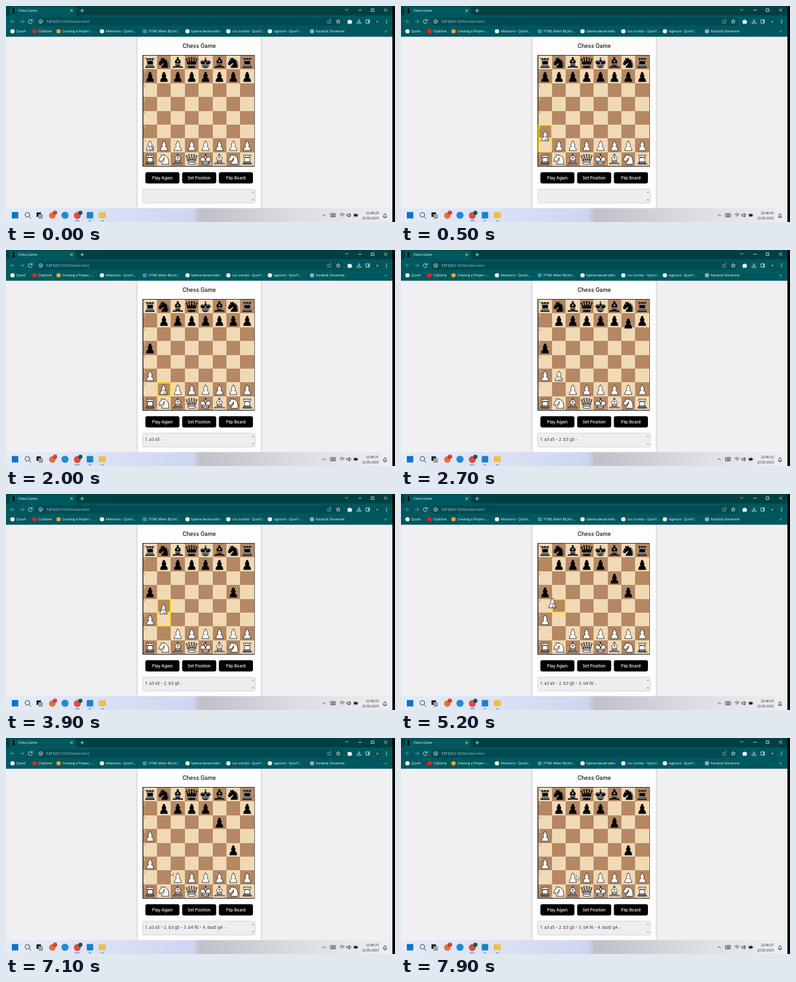
Animation, 600 px wide and 335 px high, one loop 8000 ms. Source, as an HTML page:

```html
<!DOCTYPE html>
<html lang="en">
<head>
<meta charset="utf-8">
<title>Chess Game</title>
<style>
  html, body { margin: 0; width: 100%; height: 100%; overflow: hidden; background: #f0eff2; }
  svg { display: block; width: 100%; height: 100%; }
  .ui { font: 5px "Open Sans", "Noto Sans", sans-serif; fill: #fff; }
  .page { font-family: Inter, "Open Sans", sans-serif; font-weight: 500; fill: #111; }
  .line { fill: none; stroke: #e4f0f0; stroke-width: .8; stroke-linecap: round; stroke-linejoin: round; }
  .dim { stroke: #7fa9ac; }
  .dark { stroke: #222; }
  .piece { stroke: #000; stroke-width: 1.5; stroke-linecap: round; stroke-linejoin: round; }
  .white { fill: #fff; }
  .black { fill: #000; }
  .detail, .inlay { fill: none; }
  .black .detail, .inlay { stroke: #fff; }
  .white .inlay { display: none; }
  .mark { fill: none; stroke: #ffe500; stroke-width: 1.5; }
  .note { font: 5.3px Inter, Arial, sans-serif; }
</style>
</head>
<body>
<svg id="stage" viewBox="0 0 600 335" xmlns="http://www.w3.org/2000/svg">
  <defs>
    <filter id="shadow" x="-10%" y="-10%" width="120%" height="120%">
      <feDropShadow dx="0" dy="0" stdDeviation="2.2" flood-opacity=".2"/>
    </filter>
    <linearGradient id="bar">
      <stop offset="0" stop-color="#e4ecf7"/>
      <stop offset=".17" stop-color="#dfe5f6"/>
      <stop offset=".48" stop-color="#ced5f1"/>
      <stop offset=".5" stop-color="#bfc0c8"/>
      <stop offset=".75" stop-color="#dcdde2"/>
      <stop offset="1" stop-color="#eeeff3"/>
    </linearGradient>
  </defs>

  <rect width="600" height="335" fill="#f0eff2"/>
  <rect x="203" y="46" width="190" height="268" rx="4" fill="#fdfdfe" filter="url(#shadow)"/>

  <g id="browser" class="ui">
    <rect width="600" height="47.5" fill="#004043"/>
    <path d="M3 14.5Q6 14.5 6 11V4Q6 1 9 1H105Q108 1 108 4V11Q108 14.5 111 14.5H600V47.3H0V14.5Z" fill="#00585f"/>
    <path d="M9.4 11h4.4l-1-2-.3-2.5.7-3h-3.2l.7 3-.3 2.5z" fill="#000"/>
    <text x="19" y="8.8">Chess Game</text>
    <path class="line" d="M99.5 5.5l3.5 3.5m0-3.5l-3.5 3.5M115 7.2h5m-2.5-2.5v5M523.5 5l2 2 2-2M544 6.5h4M563.5 4.5h4v4h-4zM583.5 4.5l4 4m0-4l-4 4"/>
    <rect x="46" y="17.5" width="474" height="13" rx="6.5" fill="#004b52"/>
    <path class="line dim" d="M13 24H7.5l2.5-2.5M7.5 24l2.5 2.5M22 24h5.5L25 21.5m2.5 2.5L25 26.5M498 22.5h-2v4h5v-2M498.5 24.5q0-3 3-3m-1.3-1.3l1.3 1.3-1.3 1.3"/>
    <path class="line" d="M40 22.5a3 3 0 1 0 .4 2.4M40.3 20.8v2h-2M53.3 23.8v2m0-3.7v.1"/>
    <circle class="line" cx="53.3" cy="24" r="2.8"/>
    <text x="62" y="25.8" font-size="5.5">127.0.0.1<tspan fill="#a9c6c8">:5500/index.html</tspan></text>
    <path class="line" d="M512.5 21l.9 2 2.2.2-1.7 1.4.5 2.2-1.9-1.2-1.9 1.2.5-2.2-1.7-1.4 2.2-.2zM544.5 21v4m-1.8-1.7l1.8 1.8 1.8-1.8M541.5 25.5V27h6v-1.5M555.5 21.5h5v5h-5zM559.5 21.5v5"/>
    <path d="M527 22h2q1-2 2 0h2v2q2 1 0 2v1.5h-6z"/>
    <circle cx="572.5" cy="24" r="4.6" fill="#0a4a45"/>
    <text x="571" y="25.8">d</text>
    <circle cx="587" cy="21.7" r=".7"/><circle cx="587" cy="24" r=".7"/><circle cx="587" cy="26.3" r=".7"/>
    <text x="584" y="40.8" font-size="6">»</text>
  </g>

  <g class="page">
    <text x="298" y="65" font-size="8.5" text-anchor="middle">Chess Game</text>
    <g id="buttons" font-size="6.3" text-anchor="middle"></g>
    <rect x="210.8" y="284" width="174" height="21.5" rx="3" fill="#eeeef1" stroke="#c9c9ce" stroke-width=".7"/>
    <path d="M379.3 289.8l1.6-1.8 1.6 1.8zM379.3 300.2l1.6 1.8 1.6-1.8z" fill="#777"/>
    <text id="moves" x="215" y="295.8" font-size="6.2" font-weight="400" fill="#333"></text>
  </g>

  <g id="board"></g>
  <g id="marks"></g>
  <g id="pieces"></g>

  <g id="taskbar" class="ui">
    <rect y="313.5" width="600" height="21.5" fill="url(#bar)"/>
    <rect x="9" y="319.5" width="10" height="10" fill="#0a74d1"/>
    <path class="line dark" d="M35.5 326.5l3 3"/>
    <circle class="line dark" cx="33" cy="323.8" r="3.6"/>
    <path d="M47 320h7v7h-7z" fill="#222"/>
    <path d="M50 323h7v7h-7z" fill="#9aa0a5"/>
    <circle cx="71.5" cy="325" r="5" fill="#e4702c"/>
    <circle cx="75.5" cy="320.5" r="3.2" fill="#d5272b"/>
    <text x="74.2" y="322.1" font-size="4.5">1</text>
    <circle cx="91" cy="324.5" r="5.5" fill="#258bd0"/>
    <circle cx="110" cy="325" r="5.4" fill="#dd4b3e"/>
    <circle cx="114.7" cy="320.8" r="3.2" fill="#0a5a50"/>
    <rect x="124.5" y="319.5" width="10" height="10" rx="1" fill="#1782cc"/>
    <rect x="143" y="320" width="11" height="9" rx="1" fill="#f3bd3e"/>
    <path d="M106.5 333h7M127.5 333h4M146.5 333h4" stroke="#2878c4" stroke-width="1.2"/>
    <path class="line dark" d="M489 325.5l2-2 2 2M501 322h7v5h-7zM502.5 323.8h4M503 325.5h3M515 323.2q3.5-3 7 0M516.4 325q2.1-1.8 4.2 0M518.5 326.8v.1M526 323.3h1.5l2-1.6v5.6l-2-1.6H526zM531 322.5q1.6 2 0 4M582 327q1-1 1-3 0-2 1.5-2t1.5 2q0 2 1 3zM584 328.5h1"/>
    <path d="M536.5 322.5h5.5v4h-5.5zM542.3 323.7h.8v1.6h-.8z" fill="#222"/>
    <g text-anchor="end" fill="#222">
      <text id="clock" x="575" y="322.8"></text>
      <text x="575" y="330.5">22.09.2023</text>
    </g>
  </g>
  <rect x="596" width="4" height="335"/>

  <g id="cursor">
    <circle id="busy" cx="3.5" cy="3.5" r="2.6" fill="none" stroke="#2b9bd8" stroke-width="1.3"/>
    <path d="M0 0v7.2l1.7-1.6 1.2 2.7 1.2-.6-1.2-2.5h2.3z" fill="#fff" stroke="#222" stroke-width=".5"/>
  </g>
</svg>
<script>
const LOOP = 8000, STEP = 100, CELL = 21.4, LEFT = 211.5, TOP = 77;
const LIGHT = '#f0d9b5', DARK = '#b58863';
const $ = id => document.getElementById(id);

function add(parent, tag, attrs, text = '') {
  const node = document.createElementNS('http://www.w3.org/2000/svg', tag);
  for (const key in attrs) node.setAttribute(key, attrs[key]);
  node.textContent = text;
  return parent.appendChild(node);
}

const dot = (x, y, r) => `M${x - r} ${y}a${r} ${r} 0 1 0 ${2 * r} 0a${r} ${r} 0 1 0 ${-2 * r} 0z`;

// On a 45-unit square: body, inner lines of both colours, white lines of black pieces.
const SHAPES = {
  p: { body: 'M22.5 9c-2.21 0-4 1.79-4 4 0 .89.29 1.71.78 2.38C17.33 16.5 16 18.59 16 21c0 2.03.94 3.84 2.41 5.03C15.41 27.09 11 31.58 11 39.5h23c0-7.92-4.41-12.41-7.41-13.47C28.06 24.84 29 23.03 29 21c0-2.41-1.33-4.5-3.28-5.62.49-.67.78-1.49.78-2.38 0-2.21-1.79-4-4-4z' },
  r: {
    body: 'M9 39h27v-3H9zM12 36v-4h21v4zM14 29.5V17h17v12.5l1.5 2.5h-20zM11 14V9h4v2h5V9h5v2h5V9h4v5l-3 3H14z',
    inlay: 'M12 35.5h21M13 31.5h19M14 29.5h17M14 16.5h17M11 14h23'
  },
  n: {
    body: 'M22 10c10.5 1 16.5 8 16 29H15c0-9 10-6.5 8-21M24 18c.38 2.91-5.55 7.37-8 9-3 2-2.82 4.34-5 4-1.04-.94 1.41-3.04 0-3-1 0 .19 1.23-1 2-1 0-4 1-4-4 0-2 6-12 6-12s1.89-1.9 2-3.5c-.73-1-.5-2-.5-3 1-1 3 2.5 3 2.5h2s.78-2 2.5-3c1 0 1 3 1 3',
    detail: 'M9 25.5v.1M15 15l-.8 1.3',
    inlay: 'M24.6 11.2c7.5 1.5 12.4 8.8 11.7 28'
  },
  b: {
    body: 'M9 36c3.39-.97 10.11.43 13.5-2 3.39 2.43 10.11 1.03 13.5 2 0 0 1.65.54 3 2-.68.97-1.65.99-3 .5-3.39-.97-10.11.46-13.5-1-3.39 1.46-10.11.03-13.5 1-1.35.49-2.32.47-3-.5 1.35-1.46 3-2 3-2zM15 32c2.5 2.5 12.5 2.5 15 0 .5-1.5 0-2 0-2 0-2.5-2.5-4-2.5-4 5.5-1.5 6-11.5-5-15.5-11 4-10.5 14-5 15.5 0 0-2.5 1.5-2.5 4 0 0-.5.5 0 2z' + dot(22.5, 8, 2.5),
    detail: 'M17.5 26h10M15 30h15M22.5 15.5v5M20 18h5'
  },
  q: {
    body: 'M9 26c8.5-1.5 21-1.5 27 0l2-12-7 11V11l-5.5 13.5-3-15-3 15L14 11v14L7 14zM9 26c0 2 1.5 2 2.5 4 1 1.5 1 1 .5 3.5-1.5 1-1.5 2.5-1.5 2.5-1.5 1.5.5 2.5.5 2.5 6.5 1 16.5 1 23 0 0 0 1.5-1 0-2.5 0 0 .5-1.5-1-2.5-.5-2.5-.5-2 .5-3.5 1-2 2.5-2 2.5-4-8.5-1.5-18.5-1.5-27 0z' +
      [[6, 12], [14, 9], [22.5, 8], [31, 9], [39, 12]].map(([x, y]) => dot(x, y, 2)).join(''),
    detail: 'M11.5 30c3.5-1 18.5-1 22 0M12 33.5c6-1 15-1 21 0'
  },
  k: {
    body: 'M22.5 11.6V6M20 8h5M22.5 25s4.5-7.5 3-10.5c0 0-1-2.5-3-2.5s-3 2.5-3 2.5c-1.5 3 3 10.5 3 10.5M11.5 37c5.5 3.5 15.5 3.5 21 0v-7s9-4.5 6-10.5c-4-6.5-13.5-3.5-16 4V27v-3.5c-3.5-7.5-13-10.5-16-4-3 6 5 10 5 10z',
    detail: 'M11.5 30c5.5-3 15.5-3 21 0M11.5 33.5c5.5-3 15.5-3 21 0M11.5 37c5.5-3 15.5-3 21 0',
    inlay: 'M32 29.5s8.5-4 6-9.65C34.1 14 25 18 22.5 24.5v2.1-2.1C20 18 9.9 14 7 19.85c-2.5 5.65 4.85 9 4.85 9'
  }
};

// Player drags a piece; the reply slides shortly after the drop.
const TURNS = [
  { from: 'a2', to: 'a3', grab: 200, drop: 600, reply: ['a7', 'a5'], log: '1. a3 a5 - ' },
  { from: 'b2', to: 'b3', grab: 2000, drop: 2400, reply: ['g7', 'g5'], log: '2. b3 g5 - ' },
  { from: 'b3', to: 'b4', grab: 3500, drop: 4000, reply: ['f7', 'f6'], log: '3. b4 f6 - ' },
  { from: 'b4', to: 'a5', grab: 4900, drop: 5500, reply: ['g5', 'g4'], log: '4. bxa5 g4 - ' }
];
const REPLY_DELAY = 260, SLIDE = 200;

// time, x, y of the pointer tip
const POINTER = [
  [0, 221.5, 216.5], [200, 222, 216], [600, 222.5, 196], [800, 223, 198], [1100, 225.5, 210],
  [1300, 226, 211], [1900, 243, 216], [2000, 243, 216], [2400, 243, 195], [2900, 243, 195],
  [3500, 243, 196], [3900, 243, 178], [4000, 243, 175], [4900, 242.5, 174], [5200, 233.5, 168.5],
  [5500, 222.5, 154], [5700, 224, 158], [6100, 238.5, 198.5], [6800, 252, 205], [7000, 252, 205], [7900, 270.5, 213]
];

const center = sq => [
  LEFT + CELL * (sq.charCodeAt(0) - 97 + .5),
  TOP + CELL * (8.5 - sq[1])
];
const squareAt = ([x, y]) =>
  String.fromCharCode(97 + Math.floor((x - LEFT) / CELL)) + (8 - Math.floor((y - TOP) / CELL));
const mix = (a, b, k) => a.map((v, i) => v + (b[i] - v) * k);
const swing = k => .5 - Math.cos(Math.PI * Math.min(1, Math.max(0, k))) / 2;

function pointerAt(t) {
  const i = POINTER.findIndex(p => p[0] > t);
  if (i < 0) return POINTER[POINTER.length - 1].slice(1);
  const [a, b] = [POINTER[i - 1], POINTER[i]];
  return mix(a.slice(1), b.slice(1), (t - a[0]) / (b[0] - a[0]));
}

const pieces = {};
function addPiece(kind, color, square) {
  const node = add($('pieces'), 'g', { class: 'piece ' + color });
  for (const part in SHAPES[kind]) add(node, 'path', { d: SHAPES[kind][part], class: part });
  pieces[square] = node;
  place(node, center(square));
}
function place(node, [x, y]) {
  node.setAttribute('transform', `translate(${x - CELL / 2} ${y - CELL / 2}) scale(${CELL / 45})`);
}

function buildBoard() {
  const board = $('board'), side = CELL * 8 + 2;
  add(board, 'rect', { x: LEFT - 1, y: TOP - 1, width: side, height: side, fill: '#333' });
  for (let i = 0; i < 64; i++) {
    const col = i % 8, row = i >> 3, odd = (col + row) % 2;
    const x = LEFT + col * CELL, y = TOP + row * CELL, ink = odd ? LIGHT : DARK;
    add(board, 'rect', { x, y, width: CELL, height: CELL, fill: odd ? DARK : LIGHT, 'shape-rendering': 'crispEdges' });
    if (!col) add(board, 'text', { x: x + 1, y: y + 5.8, fill: ink, class: 'note' }, 8 - row);
    if (row === 7) add(board, 'text', { x: x + CELL - 1, y: y + CELL - 1.5, fill: ink, class: 'note', 'text-anchor': 'end' }, 'abcdefgh'[col]);
  }
  [...'rnbqkbnr'].forEach((kind, i) => {
    const file = 'abcdefgh'[i];
    addPiece(kind, 'black', file + 8);
    addPiece('p', 'black', file + 7);
    addPiece(kind, 'white', file + 1);
    addPiece('p', 'white', file + 2);
  });
  // Pieces that travel stay above the rest.
  ['a7', 'f7', 'g7', 'a2', 'b2'].forEach(sq => $('pieces').appendChild(pieces[sq]));
}

function buildPage() {
  const bookmarks = [
    [16, '#f4f4f4', 'Quorli'], [50, '#e3251f', 'ClipVane'], [87, '#e9a13b', 'Creating a Project -...'],
    [154, '#f4f4f4', 'k4lessons - Quorli...'], [220, '#3f8fb5', 'HTML Metin Biçiml...'],
    [286, '#f4f4f4', 'İşleme devam edin.'], [349, '#f4f4f4', "css crumbs - Quorli'..."],
    [413, '#f4f4f4', "tagnook - Quorli'..."], [478, '#8fa9c9', 'Karabük Üniversite']
  ];
  for (const [x, fill, label] of bookmarks) {
    add($('browser'), 'circle', { cx: x - 6, cy: 39.2, r: 3.3, fill });
    add($('browser'), 'text', { x, y: 40.9 }, label);
  }
  ['Play Again', 'Set Position', 'Flip Board'].forEach((label, i) => {
    const x = 215 + 56.7 * i;
    add($('buttons'), 'rect', { x, y: 257.8, width: 52.5, height: 17.4, rx: 3, fill: '#000' });
    add($('buttons'), 'text', { x: x + 26.2, y: 268.8, fill: '#fff' }, label);
  });
}

function render(t) {
  const tip = pointerAt(t), at = {}, marks = new Set();
  let log = '';
  for (const sq of ['a2', 'b2', 'a7', 'f7', 'g7']) at[sq] = { node: pieces[sq], pos: center(sq) };
  pieces.a7.style.display = '';
  for (const { from, to, grab, drop, reply: [start, end], log: entry } of TURNS) {
    if (t < grab) break;
    if (t < drop) {
      at[from].pos = tip;
      marks.add(from).add(squareAt(tip));
      break;
    }
    if (at[to]) at[to].node.style.display = 'none';
    at[to] = { node: at[from].node, pos: center(to) };
    delete at[from];
    const since = t - drop - REPLY_DELAY;
    if (since < 0) break;
    log += entry;
    at[end] = { node: at[start].node, pos: mix(center(start), center(end), swing(since / SLIDE)) };
    delete at[start];
  }
  for (const key in at) place(at[key].node, at[key].pos);

  $('marks').replaceChildren();
  for (const sq of marks) {
    const [x, y] = center(sq), side = CELL - 1.5;
    add($('marks'), 'rect', { x: x - side / 2, y: y - side / 2, width: side, height: side, class: 'mark' });
  }
  $('moves').textContent = log;
  $('clock').textContent = '22:46:' + (29 + Math.floor((t + 900) / 1000));
  $('cursor').setAttribute('transform', `translate(${tip})`);
  $('busy').style.display = t < 200 ? '' : 'none';
}

function tick() {
  render(Math.floor(performance.now() % LOOP / STEP) * STEP);
  requestAnimationFrame(tick);
}

buildPage();
buildBoard();
tick();
</script>
</body>
</html>
```
